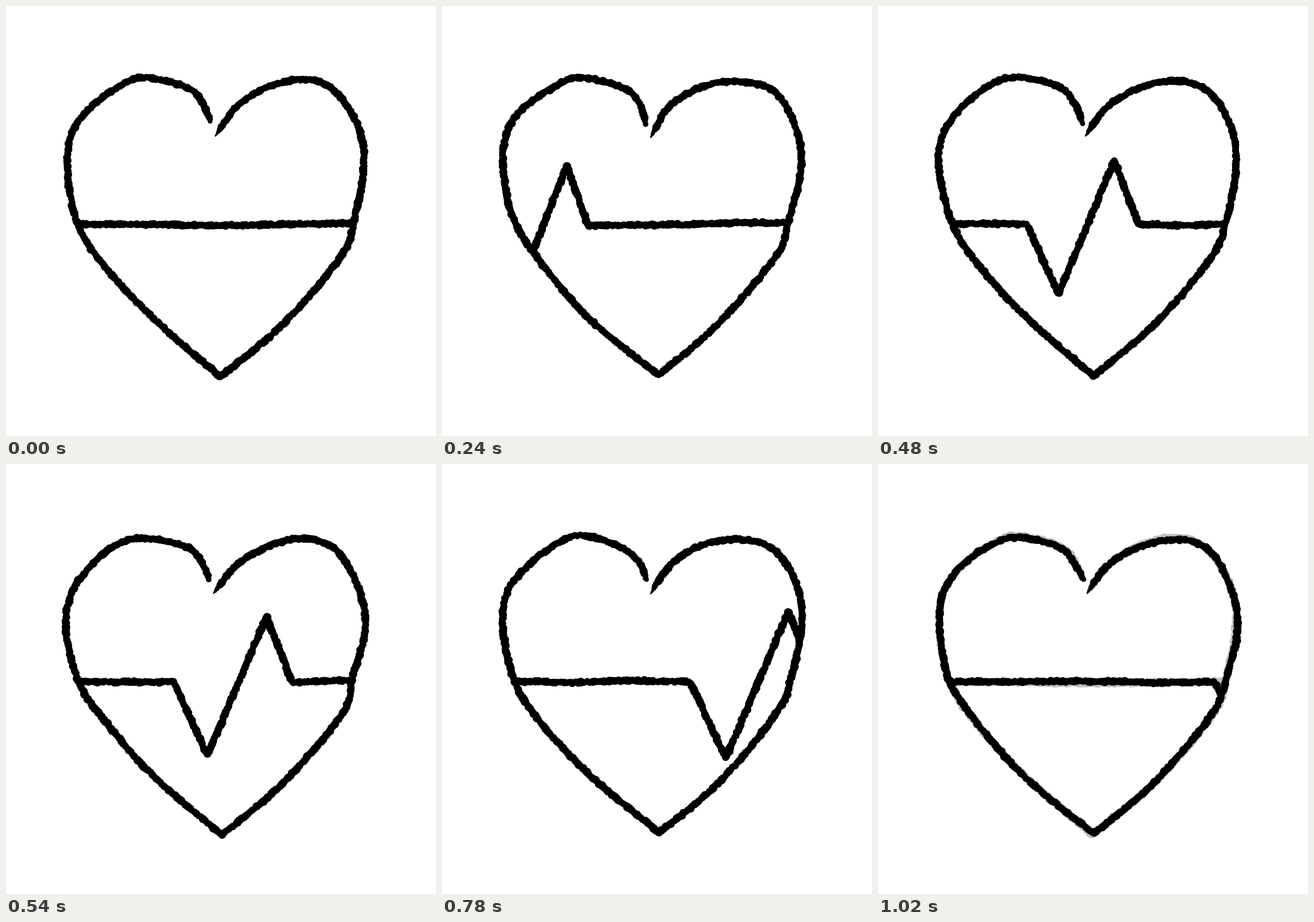
Animation, 748 px wide and 748 px high, one loop 1.08 s. Source, as an HTML page with a canvas:

```html
<!DOCTYPE html>
<html lang="en">
<head>
<meta charset="utf-8">
<title>Heartbeat</title>
<style>
  html, body { margin: 0; width: 100%; height: 100%; overflow: hidden; background: #fff; }
  canvas { display: block; }
</style>
</head>
<body>
<canvas id="stage" width="748" height="748"></canvas>
<script>
const ctx = document.getElementById('stage').getContext('2d');
const SIZE = 748, STEP = 60, COUNT = 18;

// Each half runs in drawing order and shares the tip
const TIP = [375, 643];
const LEFT = [[356, 203], [341, 170], [314, 143], [241, 126], [189, 143], [138, 184],
  [113, 229], [105, 286], [125, 372], [163, 440], [254, 540]];
const RIGHT = [[482, 554], [583, 434], [606, 373], [624, 286], [616, 218], [580, 152],
  [528, 131], [462, 140], [400, 173], [362, 228]];

function random(seed) {
  let s = seed * 7919 + 101;
  return () => {
    s = (s + 0x6D2B79F5) | 0;
    let t = Math.imul(s ^ (s >>> 15), 1 | s);
    t = (t + Math.imul(t ^ (t >>> 7), 61 | t)) ^ t;
    return ((t ^ (t >>> 14)) >>> 0) / 4294967296;
  };
}

// The beat rushes in, then crosses the heart with slowly growing speed
function beatLine(n, rnd) {
  const m = n - 6;
  const x = 196 + (m < 0 ? 56 * m : m * (30.6 + 0.44 * m));
  const w = Math.max(0.78, Math.min(1, 0.78 + 0.055 * m));
  const pts = [];
  const flat = (from, to) => {
    for (let px = from; px < to - 40; px += 85) pts.push([px, 379 + (rnd() - 0.5) * 6]);
    pts.push([to, 379]);
  };
  if (x > 60) flat(60, x);
  pts.push([x + 62 * w, 491 + 95 * (w - 0.78)], [x + 171 * w, 273 - 2.4 * m]);
  if (x + 218 * w < 700) flat(x + 218 * w, 700);
  else pts.push([x + 218 * w, 379]);
  return n < 2 ? [[60, 379], [250, 380], [370, 382], [700, 376]] : pts;
}

// Catmull-Rom curve as a fine polyline
function smooth(pts) {
  const out = [];
  for (let i = 0; i < pts.length - 1; i++) {
    const p = [pts[i - 1] || pts[i], pts[i], pts[i + 1], pts[i + 2] || pts[i + 1]];
    for (let t = 0; t < 1; t += 1 / 16) {
      out.push([0, 1].map(j => {
        const [a, b, c, d] = p.map(q => q[j]);
        return b + t / 2 * (c - a + t * (2 * a - 5 * b + 4 * c - d + t * (3 * (b - c) + d - a)));
      }));
    }
  }
  out.push(pts[pts.length - 1]);
  return out;
}

// Bumpy brush: overlapping discs of uneven size
function brush(pts, rnd, taper = () => 1) {
  const lens = pts.map((p, i) => i ? Math.hypot(p[0] - pts[i - 1][0], p[1] - pts[i - 1][1]) : 0);
  const total = lens.reduce((a, b) => a + b, 0);
  let i = 1, before = 0, d = 0;
  ctx.beginPath();
  while (d <= total) {
    while (i < pts.length - 1 && before + lens[i] < d) before += lens[i++];
    const [a, b] = [pts[i - 1], pts[i]];
    const f = lens[i] ? (d - before) / lens[i] : 0, w = taper(d, total);
    const r = (5.7 + rnd() * 1.9) * w;
    const x = a[0] + (b[0] - a[0]) * f + (rnd() - 0.5) * 2 * w;
    const y = a[1] + (b[1] - a[1]) * f + (rnd() - 0.5) * 2 * w;
    ctx.moveTo(x + r, y);
    ctx.arc(x, y, r, 0, Math.PI * 2);
    d += Math.min(5, Math.max(0.7, r * 0.8));
  }
  ctx.fill();
}

function drawPose(n, color) {
  const rnd = random(n + 1);
  const wobble = p => p.map(v => v + (rnd() - 0.5) * 6);
  const tip = wobble(TIP);
  const left = smooth([...LEFT.map(wobble), tip]);
  const right = smooth([tip, ...RIGHT.map(wobble)]);
  ctx.fillStyle = color;
  brush(left, rnd, d => Math.min(1, 0.7 + d / 40));
  brush(right, rnd, (d, total) => Math.min(1, 0.15 + (total - d) / 26));
  ctx.save();
  ctx.beginPath();
  for (const p of left.concat(right)) ctx.lineTo(p[0], p[1]);
  ctx.clip();
  brush(beatLine(n, rnd), rnd);
  ctx.restore();
}

let shown = -1;
function render(ms) {
  const n = Math.floor(ms / STEP) % COUNT;
  if (n !== shown) {
    shown = n;
    ctx.fillStyle = '#fff';
    ctx.fillRect(0, 0, SIZE, SIZE);
    // the last drawing lets the first one shine through
    if (n === COUNT - 1) drawPose(0, '#c0c0c0');
    drawPose(n, '#000');
  }
  requestAnimationFrame(render);
}
render(0);
</script>
</body>
</html>
```
